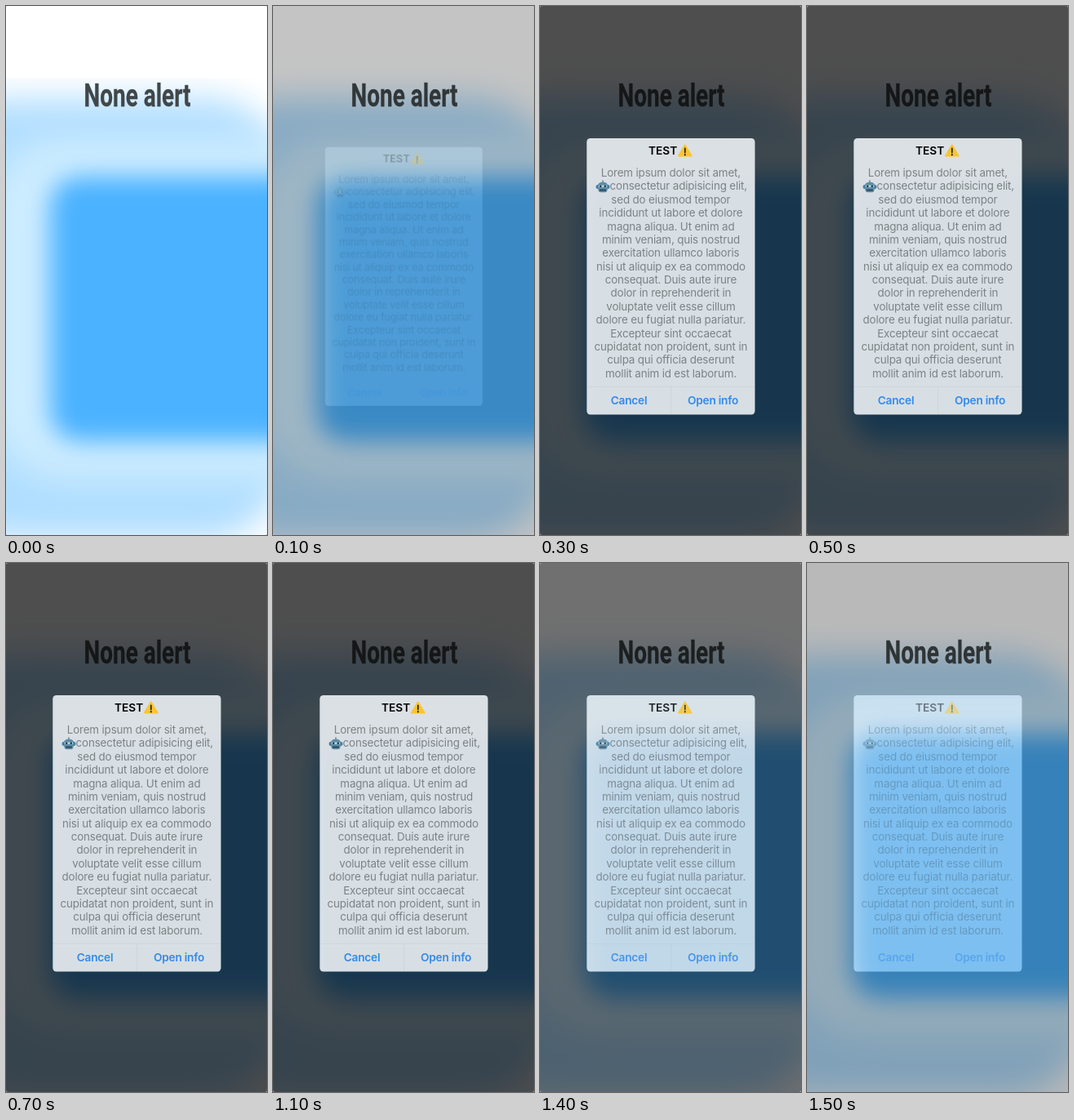
Recreate the animation shown at these times as an HTML page. Size 320 by 648 pixels, loop 1.6 s.

```html
<!DOCTYPE html>
<html lang="en">
<head>
<meta charset="utf-8">
<title>None alert</title>
<style>
  html, body { margin: 0; width: 100%; height: 100%; overflow: hidden; background: #777; }
  svg { display: block; width: 100%; height: 100%; border-radius: 2px; background: #fff; }
  text { font-family: Inter, Roboto, sans-serif; text-anchor: middle; }
  #heading {
    font: 700 38px Roboto, "Open Sans", sans-serif;
    fill: #40474a; stroke: #40474a; stroke-width: .3;
  }
  #title { font-size: 13.7px; font-weight: 600; text-anchor: start; }
  #message { font-size: 13.4px; letter-spacing: -.17px; fill: #000; fill-opacity: .42; }
  .button { font-size: 13.7px; font-weight: 600; letter-spacing: -.25px; fill: #338aea; }
  #panel { transform-origin: 160.3px 331.2px; }
</style>
</head>
<body>
<svg viewBox="0 0 320 648" preserveAspectRatio="none">
  <defs>
    <filter id="haze" x="-30%" y="-30%" width="160%" height="160%"><feGaussianBlur stdDeviation="21"/></filter>
    <filter id="soft" x="-30%" y="-30%" width="160%" height="160%"><feGaussianBlur stdDeviation="15"/></filter>
    <clipPath id="card"><rect x="57.3" y="162" width="206.2" height="338.5" rx="4.5"/></clipPath>
    <g id="sky">
      <rect width="320" height="648" fill="#fff"/>
      <rect x="-90" y="113" width="430" height="541" rx="95" fill="#b0deff" filter="url(#haze)"/>
      <rect x="-24" y="160" width="440" height="420" rx="100" fill="#cdecff" filter="url(#haze)"/>
      <rect x="54" y="209" width="350" height="324" rx="36" fill="#4cb2ff" filter="url(#soft)"/>
    </g>
  </defs>

  <use href="#sky"/>
  <rect id="lid" width="320" height="88" fill="#fff"/>
  <text id="heading" transform="translate(161 122.5) scale(.735 1)">None alert</text>
  <rect id="dim" width="320" height="648"/>

  <g id="panel">
    <g clip-path="url(#card)">
      <use id="glass" href="#sky"/>
      <rect id="tint" x="57" y="162" width="207" height="339" fill="#dce1e4"/>
    </g>
    <g id="ink">
      <text id="title" x="133" y="182">TEST</text>
      <g id="warning">
        <path d="M177.8 170.6 L185.6 183.6 H170 Z" fill="#fbc52d" stroke="#fbc52d" stroke-width="2" stroke-linejoin="round"/>
        <path d="M177.8 174.3 V179.3 M177.8 181.6 V182.6" stroke="#2b2a26" stroke-width="1.8" stroke-linecap="round"/>
      </g>
      <g id="robot">
        <path d="M77 213.5 V217" stroke="#6f8794" stroke-width="1.6"/>
        <rect x="68.6" y="219" width="16.8" height="5" rx="2" fill="#3e7ea6"/>
        <path d="M70.5 221 Q71 215.8 77 215.8 T83.5 221 L82.5 226 Q82 228.3 79.5 228.3 H74.5 Q72 228.3 71.5 226 Z" fill="#5f8ca6"/>
        <path d="M72 219.5 H82 V222 H72 Z" fill="#a9d4e6"/>
        <circle cx="74.2" cy="220.7" r="1.3" fill="#24323b"/>
        <circle cx="79.8" cy="220.7" r="1.3" fill="#24323b"/>
        <rect x="73" y="224.6" width="8" height="1.8" rx=".6" fill="#2c4658"/>
      </g>
      <g id="message"></g>
      <path id="rules" d="M57.3 466.3 H263.5 M160.4 466.3 V500.5" stroke="#000" stroke-opacity=".08" stroke-width=".7"/>
      <text class="button" x="109" y="488">Cancel</text>
      <text class="button" x="212" y="488">Open info</text>
    </g>
  </g>
</svg>
<script>
const LOOP = 1600;
const byId = id => document.getElementById(id);

const lines = [
  "Lorem ipsum dolor sit amet,", "consectetur adipisicing elit,", "sed do eiusmod tempor",
  "incididunt ut labore et dolore", "magna aliqua. Ut enim ad", "minim veniam, quis nostrud",
  "exercitation ullamco laboris", "nisi ut aliquip ex ea commodo", "consequat. Duis aute irure",
  "dolor in reprehenderit in", "voluptate velit esse cillum", "dolore eu fugiat nulla pariatur.",
  "Excepteur sint occaecat", "cupidatat non proident, sunt in", "culpa qui officia deserunt",
  "mollit anim id est laborum."
];
lines.forEach((line, i) => {
  const row = document.createElementNS("http://www.w3.org/2000/svg", "text");
  row.setAttribute("x", i === 1 ? 169.8 : 160.4); // the robot takes up the start of this row
  row.setAttribute("y", 209 + i * 16.38);
  row.textContent = line;
  byId("message").append(row);
});

// Each pose holds until the next one starts.
const poses = [
  { at: 0,    lid: 1, dim: 0,    glass: 0,   tint: 0,   ink: 0,   scale: .937 },
  { at: 100,  lid: 0, dim: .23,  glass: .3,  tint: .09, ink: .25, scale: .937 },
  { at: 200,  lid: 0, dim: .52,  glass: .9,  tint: .68, ink: .75, scale: .985 },
  { at: 300,  lid: 0, dim: .695, glass: 1,   tint: .97, ink: 1,   scale: 1 },
  { at: 1300, lid: 0, dim: .675, glass: 1,   tint: .95, ink: .98, scale: 1 },
  { at: 1400, lid: 0, dim: .56,  glass: 1,   tint: .82, ink: .85, scale: 1 },
  { at: 1500, lid: 0, dim: .275, glass: .88, tint: .36, ink: .47, scale: 1 }
];

function play(id, style) {
  const frames = [...poses, { ...poses[0], at: LOOP }].map(pose => ({
    offset: pose.at / LOOP, easing: "step-end", ...style(pose)
  }));
  byId(id).animate(frames, { duration: LOOP, iterations: Infinity });
}

for (const id of ["lid", "dim", "glass", "tint", "ink"]) {
  play(id, pose => ({ opacity: pose[id] }));
}
play("rules", pose => ({ opacity: pose.tint }));
play("panel", pose => ({ transform: `scale(${pose.scale})` }));
</script>
</body>
</html>
```
